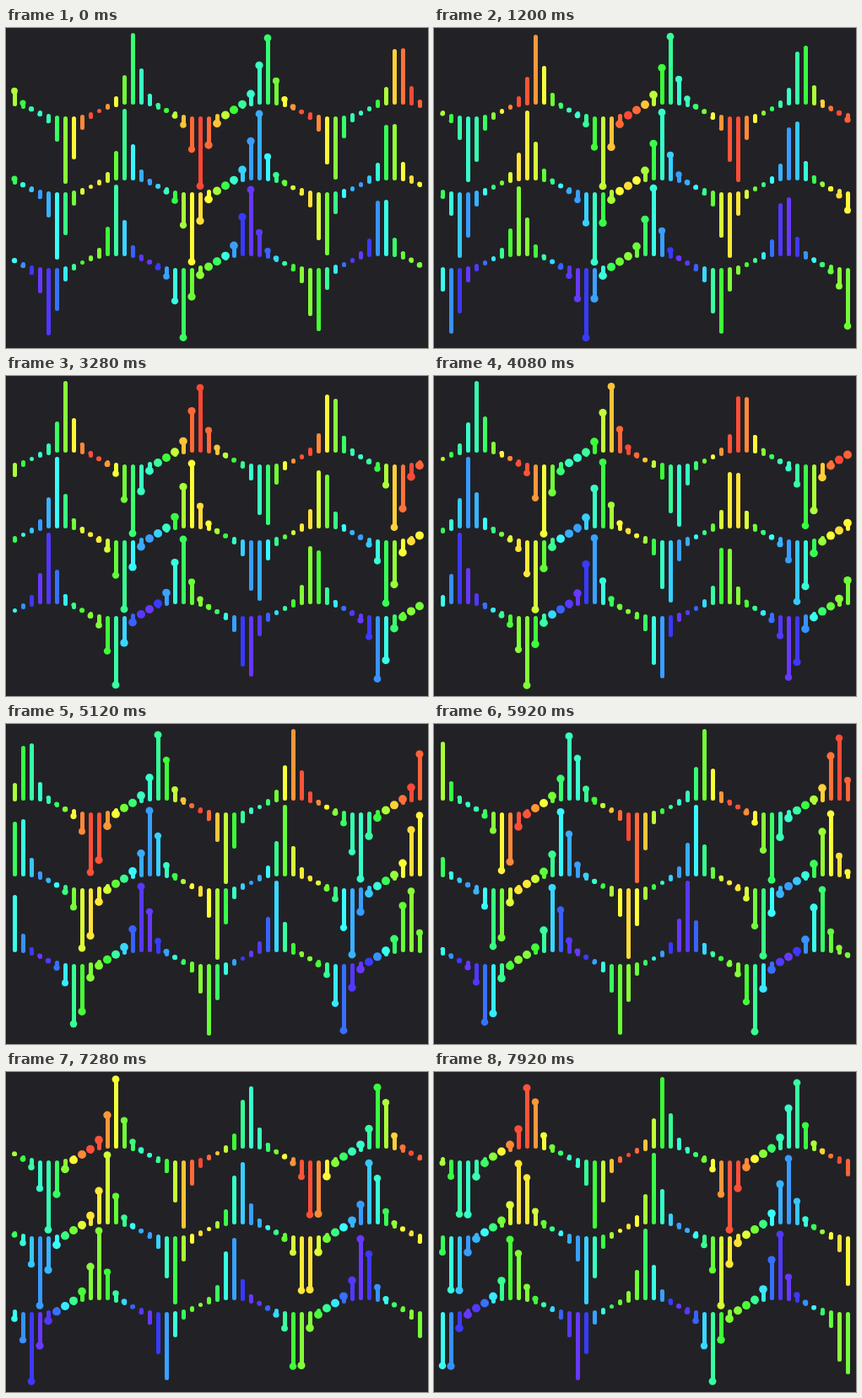
Animation of 500 by 380 pixels, one loop 8000 ms. Source, as an HTML page with a canvas:

```html
<!DOCTYPE html>
<html lang="en">
<head>
<meta charset="utf-8">
<title>Tangent waves</title>
<style>
  html, body { margin: 0; width: 100%; height: 100%; overflow: hidden; background: #222226; }
  canvas { display: block; }
</style>
</head>
<body>
<canvas id="stage" width="500" height="380"></canvas>
<script>
  const ctx = document.getElementById('stage').getContext('2d');
  const COLS = 49, ROWS = 3, GAP = 10, ROW_GAP = 90, TOP = 98;
  const LOOP = 8000, TICK = 80;
  const STEP = Math.PI / 40;  // phase per tick
  const START = 5.36;

  // Strokes sit on pixel centres, dots do not
  const snap = v => Math.floor(v) + 0.5;

  function drawPin(x, y, phase, hue) {
    const s = Math.sin(phase);
    const foot = y + 10 * s;
    const tip = y + 10 * Math.tan(1.46 * s);
    const radius = 3 + 2 * Math.sin(phase / 2);

    ctx.strokeStyle = ctx.fillStyle = `hsl(${hue}, 100%, 61%)`;
    ctx.beginPath();
    ctx.moveTo(snap(x), snap(foot));
    ctx.lineTo(snap(x), snap(tip) + 0.01);  // keeps the caps of very short strokes
    ctx.stroke();
    ctx.beginPath();
    ctx.arc(x, tip, radius, 0, 2 * Math.PI);
    ctx.fill();
  }

  function draw(time) {
    const tick = Math.floor((time % LOOP) / TICK + 0.02);
    ctx.fillStyle = '#222226';
    ctx.fillRect(0, 0, 500, 380);
    ctx.lineWidth = 5;
    ctx.lineCap = 'round';
    for (let row = 0; row < ROWS; row++) {
      for (let col = 0; col < COLS; col++) {
        const phase = START + tick * STEP + 0.4 * (col + row);
        const hue = 85 + 80 * Math.sin(col / 2) + 45 * row;
        drawPin(GAP * (col + 1), TOP + ROW_GAP * row, phase, hue);
      }
    }
  }

  const begin = performance.now();
  function loop() {
    draw(performance.now() - begin);
    requestAnimationFrame(loop);
  }
  loop();
</script>
</body>
</html>
```
